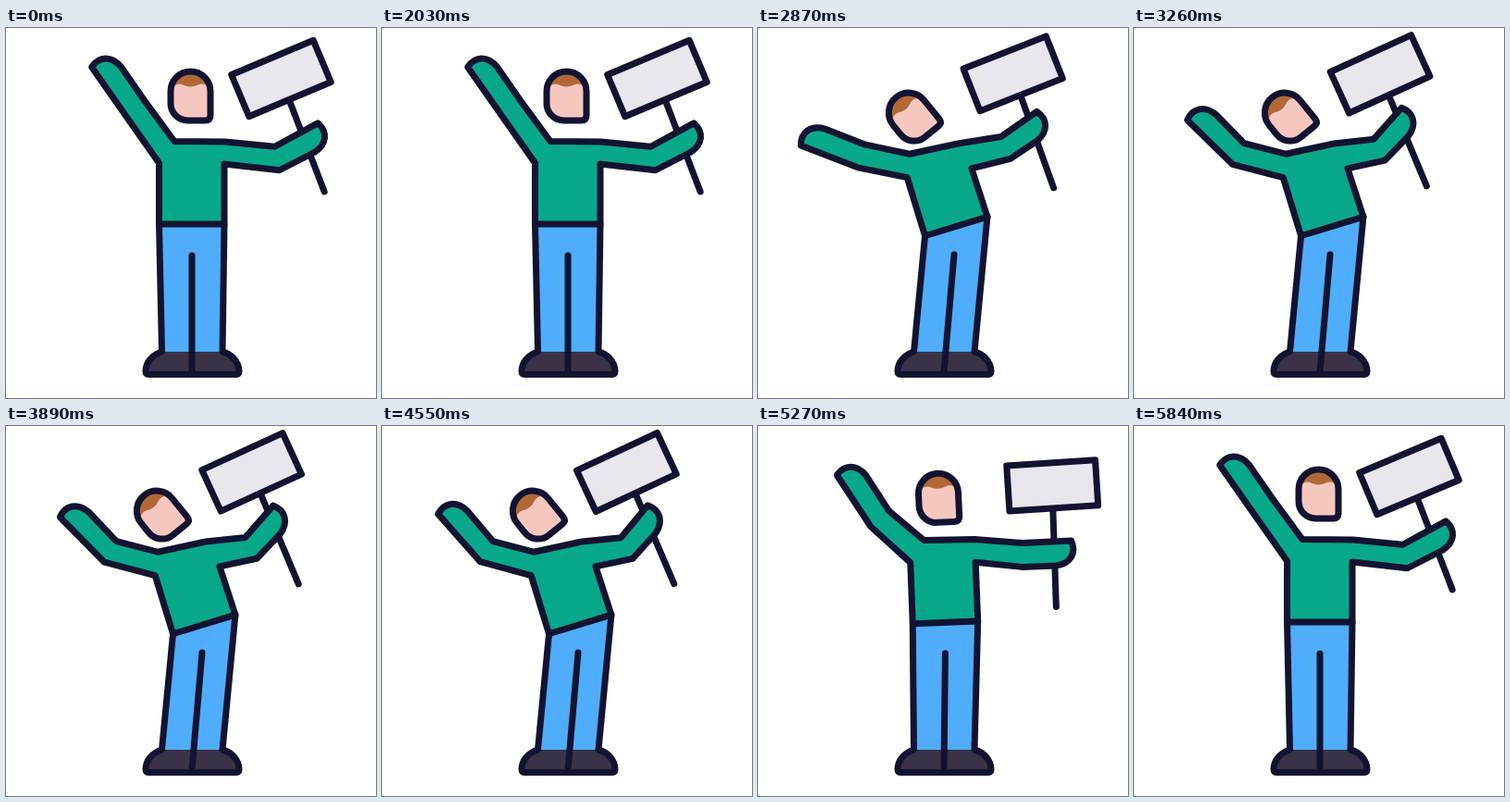
These frames come from a looping animation (400x400 px, 5.87 s). An HTML page with a canvas:

```html
<!DOCTYPE html>
<html lang="en">
<head>
<meta charset="utf-8">
<title>Protester</title>
<style>
  html, body { margin: 0; width: 100%; height: 100%; overflow: hidden; background: #fff; }
  canvas { display: block; }
</style>
</head>
<body>
<canvas id="stage" width="400" height="400"></canvas>
<script>
const ctx = document.getElementById('stage').getContext('2d');
const LOOP = 5870;
const INK = '#121331', SHIRT = '#08a88a', PANTS = '#4fadfb', SHOES = '#3a3347';
const SKIN = '#f6c7bf', HAIR = '#b26836', BOARD = '#eae6ee';
const rad = deg => deg * Math.PI / 180;

// left elbow x, y, forearm angle; right elbow x, y, forearm angle, length; grip on the pole
// (elbows are relative to the torso, angles to the stage)
const REST = [-60, -124, -125.4, 92.5, -71, -28.5, 57, 74.5];
const OUT = [-64.5, -117, -117, 87.5, -70.5, 3, 55, 75];
const LOW = [-76, -102.5, -160, 76, -65.5, -36, 50, 63];
const HIGH = [-73.5, -105, -131.5, 72.5, -64, -50, 50, 59.5];

const waves = (low, high) => [
  [2970, low], [3390, high], [3680, low], [3970, high], [4260, low], [4550, high], [4855, low]
];
const ARMS = [[2030, REST], [2250, OUT], ...waves(LOW, HIGH), [5460, OUT], [5840, REST]];
const TILT = [[2030, [-22.8]], [2290, [6.5]], [2837, [-21.5]], ...waves([-21.5], [-25]),
  [5044, [-21.5]], [5450, [6.5]], [5840, [-22.8]]];
const LEAN = [[2250, [0]], [2880, [1]], [4850, [1]], [5443, [0]]];

const ease = u => u < 0.5 ? (2 * u) ** 2.5 / 2 : 1 - (2 - 2 * u) ** 2.5 / 2;

function sample(track, t) {
  const next = track.findIndex(key => key[0] > t);
  if (next < 0) return track[track.length - 1][1];
  if (next === 0) return track[0][1];
  const [t0, from] = track[next - 1], [t1, to] = track[next];
  const k = ease((t - t0) / (t1 - t0));
  return from.map((v, i) => v + (to[i] - v) * k);
}

// Returns a function that maps local points to the stage
function frame(x, y, angle) {
  const c = Math.cos(angle), s = Math.sin(angle);
  return (u, v) => [x + u * c - v * s, y + u * s + v * c];
}

function paint(path, fill) {
  if (fill) {
    ctx.fillStyle = fill;
    ctx.fill(path);
  }
  ctx.stroke(path);
}

function addArm(path, a, b, [x, y], angle, length) {
  const upper = Math.atan2(y - (a[1] + b[1]) / 2, x - (a[0] + b[0]) / 2);
  const elbow = frame(x, y, (upper + angle) / 2), hand = frame(x, y, angle);
  path.lineTo(...a);
  path.lineTo(...elbow(0, -13));
  path.lineTo(...hand(length, -12.5));
  path.bezierCurveTo(...hand(length + 5, 1), ...hand(length - 2, 12), ...hand(length - 18, 13.5));
  path.lineTo(...elbow(0, 13));
  path.lineTo(...b);
}

const shoes = new Path2D('M169 350C158 353 151 362 151 371Q151 374.5 154 374.5H249Q252 374.5 252 371C252 362 245 353 234 350Z');
const face = new Path2D('M-21.5 -5A21.5 21.5 0 0 1 21.5 -5V21Q21.5 26.5 16 26.5H-3A18.5 18.5 0 0 1 -21.5 8Z');
const hair = new Path2D('M-21.5 -8Q-14 -15 -8 -12Q0 -8 8 -12Q15 -15 21.5 -8V-30H-21.5Z');

function drawLegs(lean, left, right) {
  const legs = new Path2D();
  legs.moveTo(...left);
  legs.lineTo(168.5, 350);
  legs.bezierCurveTo(158, 353, 151, 362, 151, 371);
  legs.quadraticCurveTo(151, 374.5, 154, 374.5);
  legs.lineTo(249, 374.5);
  legs.quadraticCurveTo(252, 374.5, 252, 371);
  legs.bezierCurveTo(252, 362, 245, 353, 234, 350);
  legs.lineTo(...right);
  ctx.fillStyle = PANTS;
  ctx.fill(legs);
  ctx.fillStyle = SHOES;
  ctx.fill(shoes);
  ctx.stroke(legs);
  const seam = new Path2D();
  seam.moveTo(201 + 11 * lean, 246 - lean);
  seam.lineTo(201, 372);
  paint(seam);
}

function drawSign(hand, tilt, grip) {
  ctx.save();
  ctx.translate(...hand);
  ctx.rotate(rad(tilt));
  ctx.translate(2.3, -grip);
  const pole = new Path2D('M-1 24L-4.4 131'), board = new Path2D('M-48 -24.5H48V24.5H-48Z');
  paint(pole);
  paint(board, BOARD);
  ctx.restore();
}

function drawHead(lean) {
  ctx.save();
  ctx.translate(199.5 - 33.5 * lean, 73.5 + 22 * lean ** 0.8);
  ctx.rotate(rad(-39 * lean ** 1.3));
  ctx.fillStyle = SKIN;
  ctx.fill(face);
  ctx.save();
  ctx.clip(face);
  ctx.fillStyle = HAIR;
  ctx.fill(hair);
  ctx.restore();
  paint(face);
  ctx.restore();
}

function draw(t) {
  const [lean] = sample(LEAN, t), [tilt] = sample(TILT, t);
  const [lx, ly, la, rx, ry, ra, length, grip] = sample(ARMS, t);
  const torso = frame(200.5 + 13.5 * lean, 212 + 2.5 * lean, rad(-17 * lean));
  const hemLeft = torso(-35, 0), hemRight = torso(35.5, 0);
  const elbowLeft = torso(lx, ly), elbowRight = torso(rx, ry);

  ctx.fillStyle = '#fff';
  ctx.fillRect(0, 0, 400, 400);
  ctx.strokeStyle = INK;
  ctx.lineWidth = 7;
  ctx.lineCap = ctx.lineJoin = 'round';

  drawLegs(lean, hemLeft, hemRight);
  drawSign(frame(...elbowRight, rad(ra))(35.5, 0), tilt, grip);

  const shirt = new Path2D();
  shirt.moveTo(...hemLeft);
  addArm(shirt, torso(-35, -66), torso(-18.5 - 6.5 * lean, -89.5), elbowLeft, rad(la), 65);
  addArm(shirt, torso(36.5 - 8.5 * lean, -89 + 4 * lean), torso(35.5 - lean, -65 + 10 * lean),
    elbowRight, rad(ra), length);
  shirt.lineTo(...hemRight);
  shirt.closePath();
  paint(shirt, SHIRT);

  drawHead(lean);
}

const start = performance.now();
function tick() {
  draw((performance.now() - start) % LOOP);
  requestAnimationFrame(tick);
}
tick();
</script>
</body>
</html>
```
